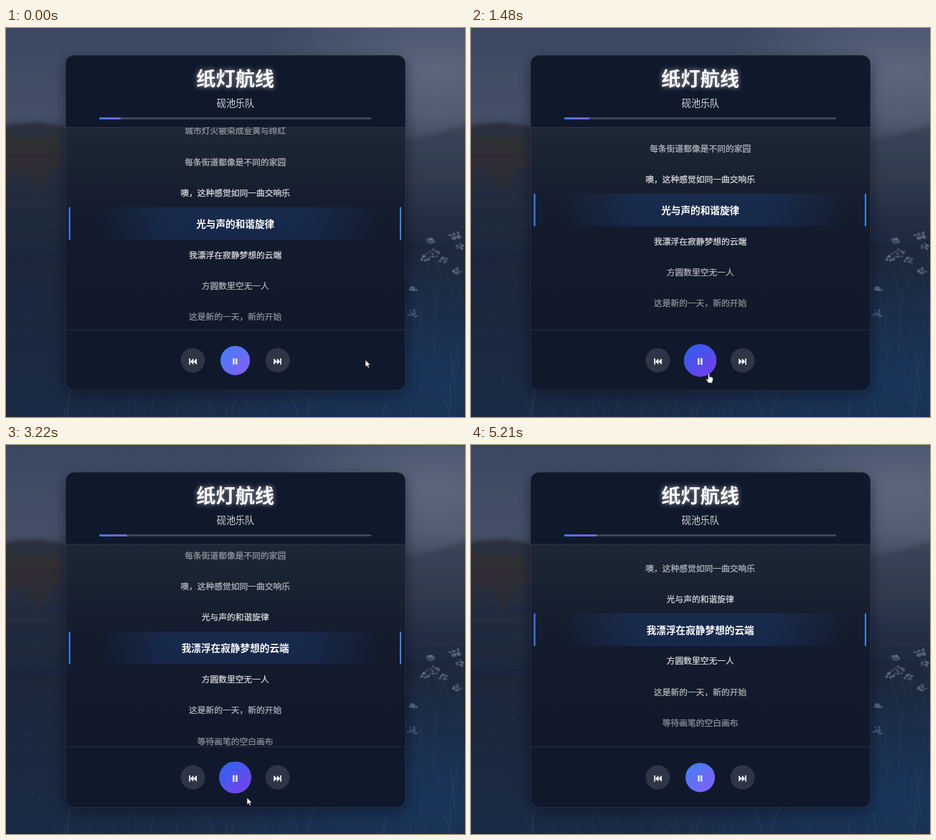
These frames come from a looping animation (640 px wide and 544 px high, 5230 ms). An HTML page:

```html
<!DOCTYPE html>
<html lang="zh-CN">
<head>
<meta charset="utf-8">
<title>歌词播放器</title>
<style>
html, body { margin: 0; width: 100%; height: 100%; overflow: hidden; background: #1c273b; }
svg { display: block; width: 640px; height: 544px; }
text { font-family: "Noto Sans CJK SC", "Noto Sans CJK", "Noto Sans", sans-serif; text-anchor: middle; fill: #fff; }
</style>
</head>
<body>
<svg id="stage" viewBox="0 0 640 544" xmlns="http://www.w3.org/2000/svg">
  <defs>
    <linearGradient id="sky" x2="0" y2="1">
      <stop offset="0" stop-color="#3b4862"/>
      <stop offset=".22" stop-color="#454f67"/>
      <stop offset=".28" stop-color="#3a4458"/>
      <stop offset=".4" stop-color="#232e42"/>
      <stop offset=".62" stop-color="#1c273b"/>
      <stop offset="1" stop-color="#1a2a44"/>
    </linearGradient>
    <radialGradient id="haze">
      <stop offset="0" stop-color="#667086" stop-opacity=".75"/>
      <stop offset="1" stop-color="#667086" stop-opacity="0"/>
    </radialGradient>
    <radialGradient id="water">
      <stop offset="0" stop-color="#19365c" stop-opacity=".9"/>
      <stop offset="1" stop-color="#19365c" stop-opacity="0"/>
    </radialGradient>
    <linearGradient id="trees" x2="0" y2="1">
      <stop offset="0" stop-color="#2a303d"/>
      <stop offset="1" stop-color="#1c273b" stop-opacity="0"/>
    </linearGradient>
    <linearGradient id="hill" x2="0" y2="1">
      <stop offset="0" stop-color="#3c465a"/>
      <stop offset=".5" stop-color="#2f394d"/>
      <stop offset="1" stop-color="#212d43" stop-opacity="0"/>
    </linearGradient>
    <linearGradient id="list" x2="0" y2="1">
      <stop offset="0" stop-color="#1e2736"/>
      <stop offset=".2" stop-color="#192231"/>
      <stop offset=".5" stop-color="#131b2c"/>
      <stop offset="1" stop-color="#10182a"/>
    </linearGradient>
    <linearGradient id="glow">
      <stop offset=".08" stop-color="#2563d0" stop-opacity="0"/>
      <stop offset=".3" stop-color="#2563d0" stop-opacity=".19"/>
      <stop offset=".7" stop-color="#2563d0" stop-opacity=".19"/>
      <stop offset=".95" stop-color="#2563d0" stop-opacity="0"/>
    </linearGradient>
    <linearGradient id="bar"><stop stop-color="#3b82f6"/><stop offset="1" stop-color="#8b5cf6"/></linearGradient>
    <linearGradient id="normal" x2="1" y2="1"><stop stop-color="#3b82f6"/><stop offset="1" stop-color="#8b5cf6"/></linearGradient>
    <linearGradient id="hover" x2="1" y2="1"><stop stop-color="#2563eb"/><stop offset="1" stop-color="#7c3aed"/></linearGradient>
    <filter id="soft" x="-30%" y="-30%" width="160%" height="160%"><feGaussianBlur stdDeviation="2.5"/></filter>
    <filter id="shadow" x="-20%" y="-20%" width="140%" height="140%"><feGaussianBlur stdDeviation="9"/></filter>
    <filter id="halo" x="-30%" y="-60%" width="160%" height="220%"><feGaussianBlur stdDeviation="3.5"/></filter>
    <clipPath id="window"><rect x="83" y="139" width="474" height="283"/></clipPath>
  </defs>

  <rect width="640" height="544" fill="url(#sky)"/>
  <ellipse cx="600" cy="60" rx="250" ry="130" fill="url(#haze)"/>
  <ellipse cx="600" cy="500" rx="380" ry="190" fill="url(#water)"/>
  <g filter="url(#soft)">
    <path d="M-20 143L12 134L48 132L100 142V330H-20Z" fill="url(#trees)"/>
    <path d="M-20 150L75 153L82 190L62 204L44 230L30 205L-20 195Z" fill="#302e30" opacity=".75"/>
    <path d="M540 160L590 150L660 130V310H540Z" fill="url(#hill)"/>
  </g>
  <g id="meadow"></g>

  <rect x="83" y="44" width="474" height="468" rx="14" fill="#050a16" opacity=".48" filter="url(#shadow)"/>
  <rect x="83" y="38" width="474" height="469" rx="12" fill="#10192c"/>
  <rect x="83" y="139" width="474" height="283" fill="url(#list)"/>
  <path d="M83 139H557M83 422H557" stroke="#fff" stroke-opacity=".1"/>
  <rect x="83" y="38" width="474" height="469" rx="12" fill="none" stroke="#fff" stroke-opacity=".09"/>

  <g font-size="27.2" font-weight="700">
    <text x="319.7" y="80.5" opacity=".6" filter="url(#halo)">纸灯航线</text>
    <text x="319.7" y="80.5">纸灯航线</text>
  </g>
  <text x="320" y="109.7" font-size="13.1" opacity=".84">砚池乐队</text>
  <rect x="130" y="125" width="379.5" height="2.8" rx="1.4" fill="#fff" fill-opacity=".2"/>
  <rect id="progress" x="130" y="125" height="2.8" rx="1.4" fill="url(#bar)"/>

  <g id="lyrics" clip-path="url(#window)"></g>

  <g fill="#fff">
    <circle cx="260.5" cy="464.7" r="17" fill-opacity=".12"/>
    <circle cx="378.7" cy="464.7" r="17" fill-opacity=".12"/>
    <path id="skip" d="M255.3 462h1.6v8.8h-1.6zM261.4 462v8.8l-4.5-4.4zM266 462v8.8l-4.6-4.4z"/>
    <use href="#skip" transform="matrix(-1 0 0 1 639.2 0)"/>
  </g>
  <g id="main">
    <circle r="20.5" fill="url(#normal)"/>
    <circle id="dark" r="20.5" fill="url(#hover)"/>
    <path id="pause" d="M-3.1-2.8h2.1v8.4h-2.1zM.7-2.8h2.1v8.4H.7z" fill="#fff"/>
    <path id="play" d="M-5.4-5.3L6.4.8L-5.4 6.9Z" fill="#fff"/>
  </g>
  <g id="cursor" stroke="#10141d" stroke-width=".7" stroke-linejoin="round" fill="#fff">
    <path id="arrow" d="M0 0V10L2.3 8L3.9 11.4L5.6 10.6L4 7.3H7.1Z"/>
    <path id="hand" d="M-1.5.8Q-.4-.6.6.8V5L2.2 4.7L3.8 5.2L5.4 6V9.2L4.3 13.4H-1L-4.2 8.6Q-3.8 7-1.5 8.4Z"/>
  </g>
</svg>
<script>
const LOOP = 5230, GAP = 43.3, SPEED = 0.0128;
const PAUSE_AT = 2430, RESUME_AT = 3080, SWITCH_AT = 1850;
const lines = ["城市灯火被染成金黄与绯红", "每条街道都像是不同的家园", "噢，这种感觉如同一曲交响乐", "光与声的和谐旋律",
  "我漂浮在寂静梦想的云端", "方圆数里空无一人", "这是新的一天，新的开始", "等待画笔的空白画布"];
const fade = [1, 0.84, 0.67, 0.52, 0.45, 0.45];

// The screen refreshes in bursts: [start, count], 120 ms apart.
const bursts = [[0, 1], [160, 1], [310, 2], [580, 3], [970, 4], [1480, 2], [1750, 2], [2020, 2], [2290, 3], [2680, 1],
  [2830, 2], [3100, 3], [3490, 3], [3880, 1], [4030, 1], [4180, 3], [4570, 4], [5080, 1], [5210, 1]];
const ticks = bursts.flatMap(([start, n]) => Array.from({ length: n }, (_, i) => start + i * 120));

// Pointer tip: [time, x, y]
const path = [[580, 501, 464], [820, 448, 484], [1090, 372, 499], [1330, 338, 488], [1480, 332, 483], [2020, 332, 485],
  [2290, 331, 486], [2410, 330, 488], [2530, 328, 499], [2680, 326, 494], [2830, 323, 485], [2950, 322, 480], [3100, 322, 481],
  [3340, 350, 505], [3490, 428, 519], [3730, 574, 532], [3880, 604, 537]];

const $ = id => document.getElementById(id);
const clamp = v => Math.min(1, Math.max(0, v));
const ramp = (t, from, to) => clamp((t - from) / (to - from));
const smooth = v => v * v * (3 - 2 * v);
const mix = (a, b, k) => a + (b - a) * k;

function add(parent, tag, attrs) {
  const el = document.createElementNS("http://www.w3.org/2000/svg", tag);
  set(el, attrs);
  return parent.appendChild(el);
}
function set(el, attrs) {
  for (const key in attrs) el.setAttribute(key, attrs[key]);
}
function show(el, on) {
  el.style.display = on ? "" : "none";
}

function paintMeadow() {
  let seed = 11;
  const rnd = (a, b) => a + (b - a) * ((seed = seed * 16807 % 2147483647) / 2147483647);
  const g = $("meadow");
  const blade = (x, y, h) => add(g, "path", {
    d: `M${x} ${y}q${rnd(-6, 6)} ${-h / 2} ${rnd(-15, 15)} ${-h}`,
    fill: "none", stroke: rnd(0, 1) < 0.35 ? "#4a5660" : "#2b4167", "stroke-width": rnd(0.5, 1.2), opacity: rnd(0.2, 0.5)
  });
  for (let i = 0; i < 70; i++) blade(rnd(75, 640), 550, rnd(12, 45));
  for (let i = 0; i < 16; i++) blade(rnd(565, 645), rnd(450, 550), rnd(40, 90));
  for (let i = 0; i < 14; i++)
    add(g, "circle", { cx: rnd(5, 80), cy: rnd(270, 520), r: rnd(0.6, 1.6), fill: "#45526a", opacity: 0.35 });
  const blooms = [[585, 321, 9], [598, 314, 10], [610, 324, 8], [592, 297, 6], [626, 291, 8], [634, 305, 7], [627, 340, 9],
    [567, 399, 7], [568, 365, 5]];
  for (const [x, y, r] of blooms) {
    add(g, "path", { d: `M${x} ${y}q6 25 12 50`, fill: "none", stroke: "#35435b", opacity: 0.4 });
    for (let k = 0; k < 8; k++) {
      const a = k * 0.8 + rnd(0, 0.5), d = r * rnd(0.25, 1);
      add(g, "ellipse", { cx: x + d * Math.cos(a), cy: y + d * 0.75 * Math.sin(a), rx: rnd(1.5, 3.2), ry: rnd(1, 2.2),
        fill: "#76829a", opacity: rnd(0.3, 0.65) });
    }
  }
}

const marks = [3, 4].map(() => {
  const g = add($("lyrics"), "g", {});
  add(g, "rect", { x: 88, y: -22.8, width: 463, height: 45.6, fill: "url(#glow)" });
  for (const x of [87.6, 549]) add(g, "rect", { x, y: -22.8, width: 2.1, height: 45.6, fill: "#3b82f6" });
  return g;
});
const rows = lines.map(line => {
  const el = add($("lyrics"), "text", { x: 319.7, stroke: "#fff" });
  el.textContent = line;
  return el;
});

function drawLyrics(played) {
  const turn = smooth(ramp(played, SWITCH_AT, SWITCH_AT + 300));
  const active = 3 + turn;
  const rowY = i => 273.9 - played * SPEED + (i - 3) * GAP;
  rows.forEach((row, i) => {
    const far = Math.abs(i - active), n = Math.floor(far), bold = far < 0.5;
    const size = mix(13.65, 11.75, Math.min(1, far));
    // A hairline stroke gives regular lines a medium weight.
    set(row, {
      y: rowY(i) + size * 0.37, "font-size": size, "font-weight": bold ? 700 : 400, "stroke-width": bold ? 0 : 0.25,
      opacity: mix(fade[n], fade[n + 1], far - n)
    });
  });
  marks.forEach((mark, k) => set(mark, {
    transform: `translate(0 ${rowY(3 + k) - 0.5})`, opacity: k ? turn : 1 - turn
  }));
}

function drawButton(t) {
  const over = ramp(t, 1250, 1450) - ramp(t, 2480, 2750) + ramp(t, 2770, 2940) - ramp(t, 3190, 3400);
  set($("main"), { transform: `translate(319.6 464.9) scale(${1 + 0.1 * over})` });
  set($("dark"), { opacity: over });
  const paused = t >= PAUSE_AT && t < RESUME_AT;
  show($("play"), paused);
  show($("pause"), !paused);
}

function drawCursor(t) {
  const next = path.findIndex(p => p[0] >= t);
  show($("cursor"), next >= 0);
  if (next < 0) return;
  const b = path[next], a = path[Math.max(0, next - 1)];
  const k = a === b ? 0 : ramp(t, a[0], b[0]);
  set($("cursor"), { transform: `translate(${mix(a[1], b[1], k)} ${mix(a[2], b[2], k)})` });
  const hand = (t >= 1300 && t < 2500) || (t >= 2800 && t < 3200);
  show($("hand"), hand);
  show($("arrow"), !hand);
}

function draw(now) {
  const time = now % LOOP;
  const t = ticks.filter(v => v <= time).pop();
  const played = Math.min(t, PAUSE_AT) + Math.max(0, t - RESUME_AT);
  set($("progress"), { width: 30 + played * 0.0034 });
  drawLyrics(played);
  drawButton(t);
  drawCursor(t);
}

paintMeadow();
draw(0);
const start = performance.now();
function loop() {
  draw(performance.now() - start);
  requestAnimationFrame(loop);
}
requestAnimationFrame(loop);
</script>
</body>
</html>
```
